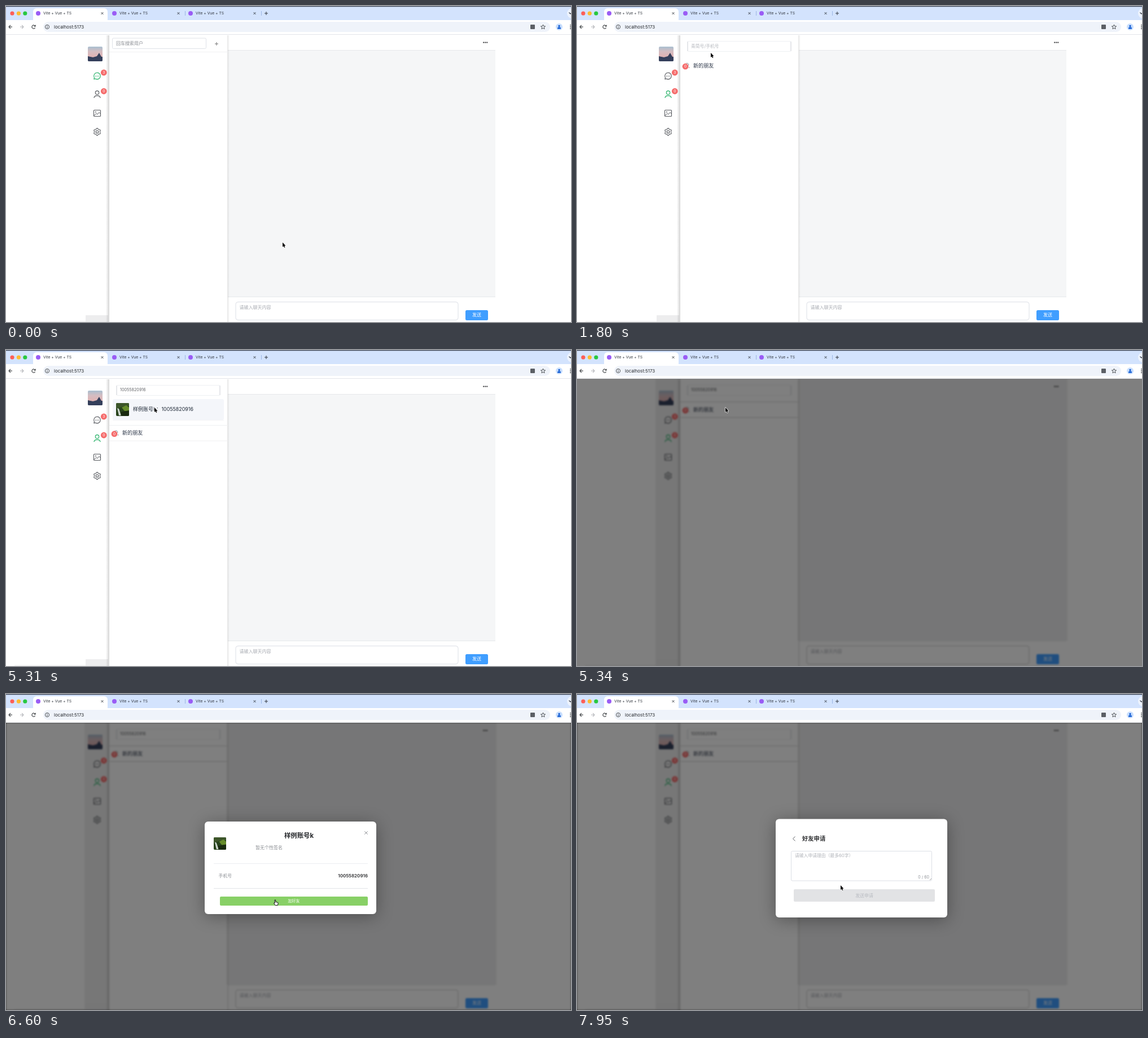
An HTML page with a canvas that plays this animation: 1001x560 px, repeating every 8000 ms.

```html
<!DOCTYPE html>
<html lang="zh">
<head>
<meta charset="utf-8">
<title>Chat</title>
<style>
html, body { margin: 0; width: 100%; height: 100%; overflow: hidden; background: #fff; }
canvas { display: block; width: 1001px; height: 560px; }
</style>
</head>
<body>
<canvas id="stage" width="1001" height="560"></canvas>
<script>
const W = 1001, H = 560, LOOP = 8000;
const FONT = "Inter, 'Noto Sans CJK SC', 'Noto Sans CJK', sans-serif";
const USER = '样例账号k', PHONE = '10055820916';
const INK = '#303133', HINT = '#a8abb2', LINE = '#dcdfe6', BLUE = '#409eff', GREEN = '#1fae62', RED = '#f56c6c';

// Moments of the story, in ms
const OPEN = 1200, FOCUS = 2070, PASTE = 2310, FOUND = 3210, LOADED = 3690,
      BLUR = 5010, DIM = 5340, CARD = 5370, APPLY = 7590, BLINK = 450;

const MOVES = [
  [450, 490, 419], [1110, 161, 155], [1290, 161, 155], [1800, 237, 83], [2040, 240, 71],
  [3690, 240, 71], [4200, 263, 102], [5880, 263, 102], [6570, 477, 365],
  [7650, 477, 365], [7920, 467, 339]
];

const stage = document.getElementById('stage').getContext('2d');
let c = stage;

const clamp = v => Math.max(0, Math.min(1, v));
const ease = v => v * v * (3 - 2 * v);

function rect(x, y, w, h, fill) {
  c.fillStyle = fill;
  c.fillRect(x, y, w, h);
}

function round(x, y, w, h, r, fill, stroke, lw = 1) {
  c.beginPath();
  c.roundRect(x, y, w, h, r);
  if (fill) { c.fillStyle = fill; c.fill(); }
  if (stroke) { c.strokeStyle = stroke; c.lineWidth = lw; c.stroke(); }
}

function disc(x, y, r, fill, stroke, lw = 1) {
  c.beginPath();
  c.arc(x, y, r, 0, 7);
  if (fill) { c.fillStyle = fill; c.fill(); }
  if (stroke) { c.strokeStyle = stroke; c.lineWidth = lw; c.stroke(); }
}

function trace(points, close) {
  c.beginPath();
  for (let i = 0; i < points.length; i += 2) c.lineTo(points[i], points[i + 1]);
  if (close) c.closePath();
}

function line(points, color, lw = 1) {
  trace(points);
  c.strokeStyle = color;
  c.lineWidth = lw;
  c.stroke();
}

function poly(points, fill) {
  trace(points, true);
  c.fillStyle = fill;
  c.fill();
}

function text(s, x, y, size, color, align = 'left', weight = 400) {
  c.font = `${weight} ${size}px ${FONT}`;
  c.textAlign = align;
  c.textBaseline = 'middle';
  c.fillStyle = color;
  c.fillText(s, x, y);
}

function cross(x, y, r, color, lw = 1) {
  line([x - r, y - r, x + r, y + r], color, lw);
  line([x - r, y + r, x + r, y - r], color, lw);
}

function plus(x, y, r, color) {
  line([x - r, y, x + r, y], color);
  line([x, y - r, x, y + r], color);
}

function dots(x, y, gap, r, color) {
  for (let i = -1; i < 2; i++) disc(x + i * gap, y, r, color);
}

function badge(x, y, n) {
  disc(x, y, 5.4, RED);
  text(n, x, y + .3, 6.5, '#fff', 'center');
}

function gradient(y0, y1, ...colors) {
  const g = c.createLinearGradient(0, y0, 0, y1);
  colors.forEach((v, i) => g.addColorStop(i / (colors.length - 1), v));
  return g;
}

function skyPhoto(x, y) {
  c.save();
  round(x, y, 26, 26, 2);
  c.clip();
  rect(x, y, 26, 26, gradient(y, y + 26, '#a9bfd0', '#d5bdc1', '#dfb4b4', '#6e7588'));
  poly([x, y + 17, x + 9, y + 19, x + 16, y + 17, x + 20, y + 11, x + 24, y + 18, x + 26, y + 18,
    x + 26, y + 26, x, y + 26], '#343f5b');
  c.restore();
}

function forestPhoto(x, y, s) {
  c.save();
  c.translate(x, y);
  c.scale(s / 23, s / 23);
  round(0, 0, 23, 23, 2);
  c.clip();
  rect(0, 0, 23, 23, '#27421b');
  poly([0, 0, 23, 0, 23, 5, 10, 7, 0, 10], '#3c5529');
  poly([10, 8, 18, 4, 23, 8, 23, 14, 15, 14], '#668c2b');
  poly([2, 9, 5, 10, 9, 22, 5, 22], '#cbd5cc');
  poly([8, 16, 23, 13, 23, 23, 9, 23], '#18290f');
  c.restore();
}

function browser() {
  rect(0, 0, W, 51, '#fff');
  rect(0, 0, W, 25, '#d3e3fd');
  rect(0, 0, W, 1.3, '#3c4252');
  round(48, 4, 132, 26, 6, '#fff');
  rect(0, 25, W, 25, '#fff');
  ['#fe5f57', '#febc2e', '#28c840'].forEach((v, i) => disc(11 + i * 11.4, 13, 3.6, v));
  for (let i = 0; i < 3; i++) {
    const x = 57 + i * 135;
    disc(x, 13, 4, '#9a5cf5');
    text('Vite + Vue + TS', x + 9, 13, 6.75, '#333840');
    cross(x + 113.5, 13, 2, '#333840', .9);
    if (i) rect(x + 125, 9, 1, 8, '#9bb6e3');
  }
  plus(461, 13, 3, '#333840');
  disc(1003, 13, 9, '#edf3fe');
  line([997.5, 11.5, 1000, 14, 1003, 11], '#333840', 1.1);

  round(66, 28, 898, 18, 9, '#eff3fa');
  const dark = '#3c4043';
  for (const [x, d, color] of [[8, -1, dark], [28, 1, '#b4b7bb']]) {
    line([x - 3 * d, 37, x + 3 * d, 37], color, 1.1);
    line([x, 34, x + 3 * d, 37, x, 40], color, 1.1);
  }
  c.beginPath();
  c.arc(49, 37, 3, .5, 5.5);
  c.strokeStyle = dark;
  c.lineWidth = 1.1;
  c.stroke();
  poly([52.6, 33, 52.6, 36.6, 49.2, 36.6], dark);
  disc(73, 37, 3.6, null, dark, .9);
  rect(72.5, 36.5, 1, 2.6, dark);
  rect(72.5, 34.7, 1, 1, dark);
  text('localhost:5173', 85, 37.3, 7.9, '#25282c');
  round(929, 33, 8, 8, 1, '#5b5f65');
  const star = [];
  for (let i = 0; i < 11; i++) {
    const a = i * Math.PI / 5 - Math.PI / 2, r = i % 2 ? 1.9 : 4.3;
    star.push(951.5 + r * Math.cos(a), 37.3 + r * Math.sin(a));
  }
  line(star, dark, .9);
  disc(980, 37, 6, '#c8defd');
  disc(980, 35.4, 1.6, '#0b57d0');
  round(977, 37.6, 6, 2.8, [2, 2, 0, 0], '#0b57d0');
  for (let i = -1; i < 2; i++) disc(1000, 37 + i * 3.2, .9, dark);
  rect(0, 50, W, 1, '#e3e5e9');
}

function sidebar(contacts) {
  skyPhoto(145, 72);
  const gray = '#55585d', chat = contacts ? gray : GREEN, person = contacts ? GREEN : gray;
  c.lineJoin = 'round';
  c.beginPath();
  c.arc(161.5, 124, 5.8, 2.6, 8.4);
  c.lineTo(155.8, 129.6);
  c.closePath();
  c.strokeStyle = chat;
  c.lineWidth = 1.1;
  c.stroke();
  dots(161.5, 124.2, 2.7, .75, chat);

  disc(161.5, 153.6, 3.2, null, person, 1.1);
  c.beginPath();
  c.moveTo(156, 163);
  c.bezierCurveTo(156, 157.5, 167, 157.5, 167, 163);
  c.stroke();

  round(155.5, 184.5, 12, 11, 1, null, gray, 1.1);
  disc(159, 187.8, 1, gray);
  line([156, 194, 160, 190.5, 162, 192, 165, 188.5, 167.5, 191], gray);

  const gear = [];
  for (let i = 0; i <= 48; i++) {
    const a = i * Math.PI / 24, r = 5.6 + .8 * Math.cos(6 * a + Math.PI);
    gear.push(161.5 + r * Math.cos(a), 223 + r * Math.sin(a));
  }
  line(gear, gray, 1.1);
  disc(161.5, 223, 2.3, null, gray, 1.1);
  badge(173.3, 118, '3');
  badge(173.3, 151, '0');
}

function searchBox(t) {
  const on = clamp((t - FOCUS) / 90) * (1 - clamp((t - BLUR) / 90));
  round(196, 62.5, 183, 18, 2, '#fff', '#eef0f3');
  rect(195.5, 63, 1, 17, '#d3d6dc');
  rect(378.5, 63, 1, 17, '#d3d6dc');
  if (on) {
    c.globalAlpha = on;
    round(196, 62.5, 183, 18, 2, null, BLUE);
    c.globalAlpha = 1;
  }
  const pasted = t >= PASTE;
  if (pasted) text(PHONE, 202, 71.3, 7.2, '#606266');
  else text('青简号/手机号', 202, 71.3, 7.8, '#b4b7bd');
  if (t < FOCUS || t >= BLUR) return;
  if (!pasted) rect(201, 67, 1, 8, INK);
  else {
    if (Math.floor((t - PASTE) / BLINK) % 2 === 0) rect(250, 67, 1, 8, INK);
    disc(368.5, 71.2, 3, null, '#b4b7bd', .8);
    cross(368.5, 71.2, 1.2, '#b4b7bd', .8);
  }
}

function contactList(t, dim) {
  searchBox(t);
  const found = t >= FOUND && !dim;
  const y = found ? 147.5 : 106;
  if (found) {
    if (t >= LOADED) {
      if (pointer(t).y >= 87) round(189, 87, 197, 37, 3, '#f4f6fa');
      forestPhoto(195, 94, 23);
    }
    rect(189, 124, 197, 1, '#f3f4f6');
    text(USER + '：', 225, 105.5, 9, '#1f2937');
    text(PHONE, 275.5, 105.5, 8.9, '#1f2937');
  }
  if (found || dim) {
    const edge = dim ? '#cfcfcf' : '#eff0f2';
    rect(183, y - 14.5, 210, 1, edge);
    rect(183, y + 13, 210, 1, edge);
  }
  c.beginPath();
  c.arc(195, y - 2, 2.6, 3.8, 7.2);
  c.strokeStyle = '#6b7078';
  c.lineWidth = .8;
  c.stroke();
  rect(198, y + 2.5, 1.2, 1.2, '#6b7078');
  badge(192, y + 1.2, '0');
  text('新的朋友', 206, y, 9.1, '#2c3648');
}

function page(t, dim) {
  rect(0, 51, W, H - 51, '#fff');
  if (dim) rect(139, 51, 48, H, '#efefef');
  rect(141, 548, 40, 12, '#ededee');
  rect(15, 558.5, 126, 1, '#ececec');
  const edge = c.createLinearGradient(177, 0, 183, 0);
  edge.addColorStop(0, 'rgba(0,0,0,0)');
  edge.addColorStop(1, 'rgba(0,0,0,.17)');
  rect(177, 52, 6, 508, edge);
  rect(183, 51, 210, 509, '#fff');
  sidebar(t >= OPEN);

  rect(393, 78, 474, 437, '#f5f6f7');
  if (dim) rect(391, 51, 478, 464, '#eeeeef');
  else rect(393, 78, 474, 1, '#e6e8eb');
  rect(393, 515, 474, 1, '#e6e8eb');
  const fold = c.createLinearGradient(392, 0, 396, 0);
  fold.addColorStop(0, 'rgba(0,0,0,.1)');
  fold.addColorStop(1, 'rgba(0,0,0,0)');
  rect(392, 52, 4, 508, fold);
  dots(849.2, 64.7, 3, 1.1, INK);
  round(407, 524.5, 394, 32, 4, '#fff', dim ? '#c8c8c8' : LINE);
  text('请输入聊天内容', 413.5, 534.5, 8, HINT);
  round(814, 539, 40, 18, 2.5, BLUE);
  text('发送', 834, 548, 8, '#fff', 'center', 500);

  if (t >= OPEN) contactList(t, dim);
  else {
    round(188.5, 57, 166, 18.5, 2, '#fff', LINE, .9);
    text('回车搜索用户', 195, 66.5, 8, '#8b8e94');
    plus(373, 67, 3, '#777');
    rect(183, 81, 210, 1, '#f0f1f2');
  }
}

let backdrop;
function dimmed() {
  if (!backdrop) {
    backdrop = document.createElement('canvas');
    backdrop.width = W;
    backdrop.height = H;
    c = backdrop.getContext('2d');
    page(DIM, true);
    c = stage;
  }
  c.save();
  c.beginPath();
  c.rect(0, 51, W, H - 51);
  c.clip();
  c.filter = 'blur(1.6px)';
  c.drawImage(backdrop, 0, 0);
  c.filter = 'none';
  rect(0, 51, W, H - 51, 'rgba(0,0,0,.5)');
  c.restore();
}

function panel(y, h) {
  c.save();
  c.shadowColor = 'rgba(0,0,0,.34)';
  c.shadowBlur = 30;
  c.shadowOffsetY = 4;
  round(352, y, 304, h, 6, '#fff');
  c.restore();
}

function userCard(t) {
  const k = ease(clamp((t - CARD) / 300));
  c.save();
  c.globalAlpha = k;
  c.translate(0, -20 * (1 - k));
  panel(226, 164);
  cross(638, 246, 2.8, '#85888e', .9);
  text(USER, 519, 251.5, 11.4, '#26282c', 'center', 700);
  forestPhoto(368, 254, 22);
  text('暂无个性签名', 442, 273, 8, '#8d9095');
  rect(368, 300, 273, 1, '#eceef1');
  text('手机号', 376.5, 323, 7.9, '#8d9095');
  text(PHONE, 641, 323, 8, INK, 'right', 600);
  rect(368, 344, 273, 1, '#e2e4e8');
  round(379, 359, 262, 16, 2, pointer(t).y > 359 ? '#88d066' : '#67c23a');
  text('加好友', 510, 367, 7, '#fff', 'center', 500);
  c.restore();
}

function applyCard() {
  panel(221.5, 174.5);
  line([386.5, 252.5, 382.5, 256.5, 386.5, 260.5], '#606266', 1);
  text('好友申请', 399, 256.5, 10.3, INK, 'left', 700);
  round(379.5, 278.5, 249, 52.5, 2, '#fff', LINE);
  text('请输入申请理由（最多60字）', 386, 287, 7.8, '#b1b4ba');
  text('0 / 60', 624, 325, 7, '#909399', 'right');
  line([625, 330, 628, 327], '#777', .7);
  round(384, 346, 250, 22, 2, '#e2e3e5');
  text('发送申请', 509, 357.3, 7.9, '#b9bcc2', 'center');
}

function pointer(t) {
  let a = MOVES[0], b = a;
  for (const m of MOVES) {
    b = m;
    if (m[0] > t) break;
    a = m;
  }
  const k = a === b ? 0 : ease(clamp((t - a[0]) / (b[0] - a[0])));
  return { x: a[1] + (b[1] - a[1]) * k, y: a[2] + (b[2] - a[2]) * k };
}

function cursor(t) {
  if (t >= PASTE && t < LOADED) return;
  const { x, y } = pointer(t);
  c.save();
  c.translate(x, y);
  c.lineJoin = 'round';
  if (t > OPEN && t < DIM && x > 196 && y > 62 && y < 80) {
    line([-1.5, -4.5, 0, -3.5, 1.5, -4.5], '#222', .9);
    line([0, -3.5, 0, 3.5], '#222', .9);
    line([-1.5, 4.5, 0, 3.5, 1.5, 4.5], '#222', .9);
  } else if (t > CARD && t < APPLY && y > 359) {
    trace([-1, 0, .6, 0, 1, 3.6, 4.6, 4.4, 5.2, 6, 4.2, 9.5, .2, 9.5, -2.6, 5.6, -1.8, 4.8, -.6, 5.6], true);
    c.fillStyle = '#fff';
    c.fill();
    c.strokeStyle = '#111';
    c.lineWidth = 1;
    c.stroke();
  } else {
    trace([0, 0, 0, 8, 1.8, 6.4, 3.1, 9.2, 4.4, 8.6, 3.2, 5.9, 5.4, 5.7], true);
    c.strokeStyle = '#fff';
    c.lineWidth = 1.2;
    c.stroke();
    c.fillStyle = '#000';
    c.fill();
  }
  c.restore();
}

function frame(now) {
  const t = now % LOOP;
  if (t < DIM) page(t, false);
  else {
    dimmed();
    if (t >= APPLY) applyCard();
    else if (t >= CARD) userCard(t);
  }
  browser();
  cursor(t);
}

const start = performance.now();
function tick() {
  frame(performance.now() - start);
  requestAnimationFrame(tick);
}
tick();
</script>
</body>
</html>
```
